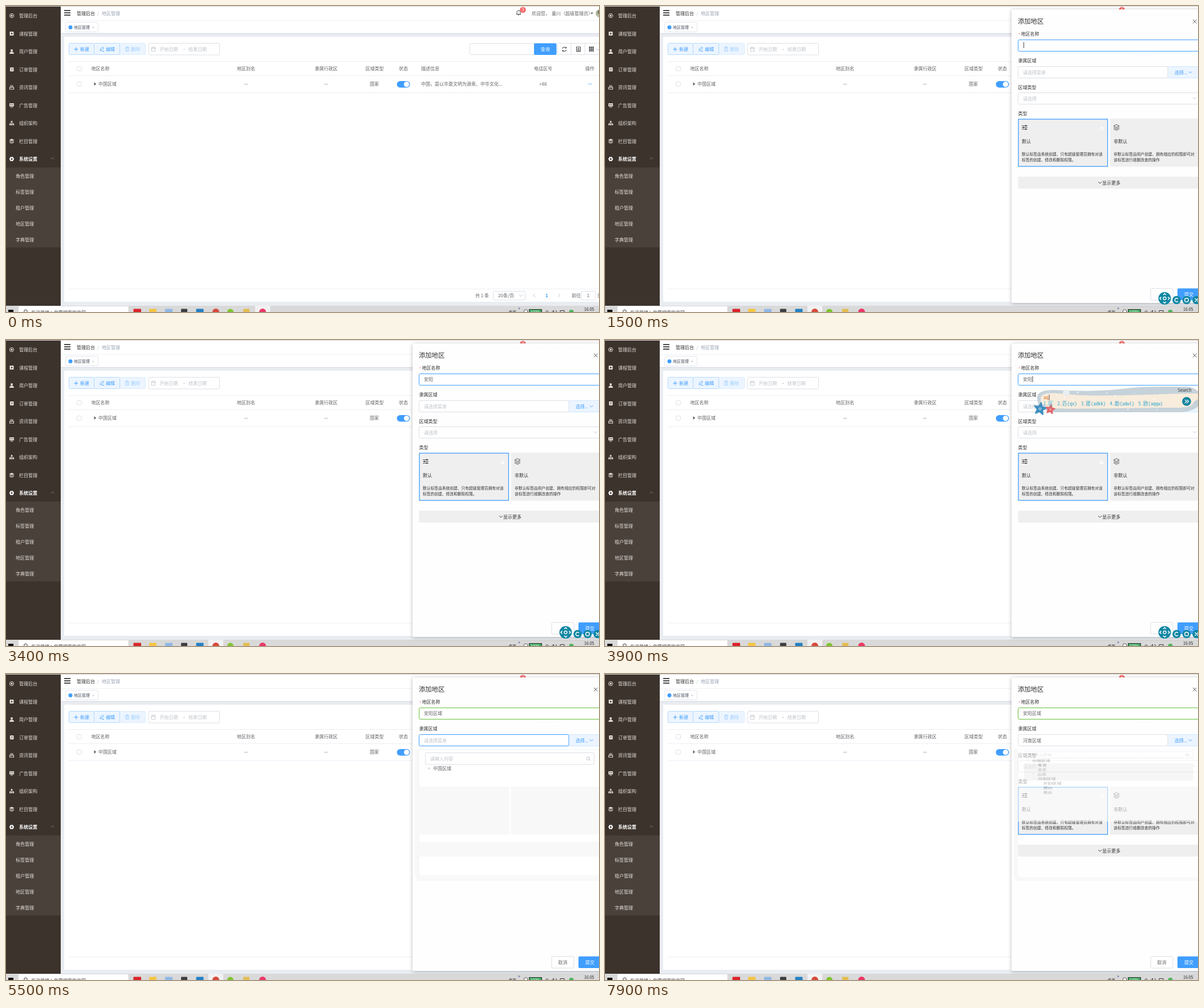
Recreate the animation shown at these times as an HTML page. Size 1040 by 538 pixels, loop 8 s.

```html
<!DOCTYPE html>
<html lang="zh-CN">
<head>
<meta charset="utf-8">
<title>地区管理</title>
<style>
html, body { margin: 0; width: 100%; height: 100%; overflow: hidden; background: #fff; }
svg { display: block; width: 1040px; height: 538px; }
text { font-family: "Noto Sans CJK SC", "Noto Sans CJK", "Noto Sans", sans-serif; white-space: pre; }
.code text { font-family: "Noto Sans Mono CJK SC", "Noto Sans CJK SC", monospace; }
.anim { animation: 8s step-end infinite; }
.name { animation-name: name; }
.parent { animation-name: parent; }
.caret { animation-name: caret; }
.pop { animation-name: pop; transform-origin: 724px 133px; }
.rows { animation-name: rows; }
.kids { animation-name: kids; }
@keyframes name {
  0% { stroke: #dcdfe6; } 17.5% { stroke: #8ec5ff; } 18.75% { stroke: #409eff; }
  65% { stroke: #67c23a; }
}
@keyframes parent {
  0% { stroke: #dcdfe6; } 63.75% { stroke: #8ec5ff; } 65% { stroke: #409eff; }
  77.5% { stroke: #8ec5ff; } 78.75% { stroke: #dcdfe6; }
}
@keyframes caret {
  0% { opacity: 0; transform: none; }
  17.5% { opacity: 1; transform: none; }
  23.75% { opacity: 0; transform: none; }
  26.25% { opacity: 1; transform: translateX(1px); }
  31.25% { opacity: 0; transform: none; }
  36.25% { opacity: 1; transform: translateX(15.5px); }
  42.5% { opacity: 0; transform: none; }
  46.25% { opacity: 1; transform: translateX(15.5px); }
  53.75% { opacity: 1; transform: translateX(31.5px); }
  60% { opacity: 0; transform: none; }
}
@keyframes pop {
  0% { opacity: 0; transform: none; }
  65% { opacity: .4; transform: scaleY(.5); }
  66.25% { opacity: .8; transform: scaleY(.85); }
  67.5% { opacity: .95; transform: scaleY(.97); }
  68.75% { opacity: 1; transform: none; }
  98.75% { opacity: .58; transform: scaleY(.57); }
}
@keyframes rows {
  0% { opacity: 0; clip-path: inset(0 0 100% 0); }
  77.5% { opacity: 1; clip-path: inset(0 0 65% 0); }
  78.75% { opacity: 1; clip-path: inset(0 0 20% 0); }
  80% { opacity: 1; clip-path: none; }
}
@keyframes kids {
  0% { opacity: 0; clip-path: inset(0 0 100% 0); }
  87.5% { opacity: 1; clip-path: inset(0 0 65% 0); }
  88.75% { opacity: 1; clip-path: inset(0 0 20% 0); }
  90% { opacity: 1; clip-path: none; }
}
</style>
</head>
<body>
<svg id="stage" viewBox="0 0 1040 538"></svg>
<script>
const INK = '#606266', DARK = '#303133', MUTE = '#bcc0c8', LINE = '#dcdfe6', BLUE = '#409eff', PALE = '#ecf5ff';
const LOOP = 8000;
let css = '';

const text = (x, y, s, fill = INK, size = 8, more = '') =>
  `<text x="${x}" y="${y + size * .38}" font-size="${size}" fill="${fill}" ${more}>${s}</text>`;
const mid = (x, y, s, fill, size) => text(x, y, s, fill, size, 'text-anchor="middle"');
const rect = (x, y, w, h, fill, more = '') =>
  `<rect x="${x}" y="${y}" width="${w}" height="${h}" fill="${fill}" ${more}/>`;
const box = (x, y, w, h, stroke = LINE, fill = '#fff', more = '') =>
  rect(x, y, w, h, fill, `stroke="${stroke}" rx="2" ${more}`);
const dot = (x, y, r, fill, more = '') => `<circle cx="${x}" cy="${y}" r="${r}" fill="${fill}" ${more}/>`;
const line = (d, stroke = INK, w = 1, more = '') =>
  `<path d="${d}" fill="none" stroke="${stroke}" stroke-width="${w}" ${more}/>`;
const shape = (d, fill, more = '') => `<path d="${d}" fill="${fill}" ${more}/>`;
const at = (x, y, s) => `<g transform="translate(${x} ${y})">${s}</g>`;
const down = (x, y, c = MUTE) => line(`M${x - 3} ${y - 1.5}l3 3 3-3`, c, .9);
const lens = (x, y, c, r = 2.8) => dot(x, y, r, 'none', `stroke="${c}"`) + line(`M${x + r * .7} ${y + r * .7}l2 2`, c);

// Shows a group from a to b milliseconds of each loop.
function during(a, b, s) {
  const p = t => t * 100 / LOOP;
  css += `@keyframes w${a}_${b}{0%{opacity:0}${p(a)}%{opacity:1}${p(b)}%{opacity:0}}`;
  return `<g class="anim" style="animation-name:w${a}_${b}">${s}</g>`;
}

function sidebar() {
  const c = '#e4dfda', hole = '#3c332d';
  const icons = [
    dot(0, 0, 3.6, 'none', `stroke="${c}"`) + dot(0, 0, 1.7, c),
    rect(-3.5, -3.5, 7, 7, c, 'rx="1"') + shape('M-1-2l3 2-3 2z', hole),
    dot(0, -2, 2, c) + shape('M-4 4c0-5 8-5 8 0z', c),
    rect(-3, -3.5, 6.5, 7, c, 'rx="1"') + line('M-1-1h3M-1 1h2', hole, .8),
    line('M-2.5-3h5M-3.5 3.3h7V0h-7z', c, 1.1) + line('M-3-1h6', c),
    rect(-4, -3.5, 8, 5.5, c, 'rx=".5"') + line('M-2 3.5h4', c) + line('M-2.5-1h2M1-1h1.5', hole, 1.4),
    line('M0-2v2M-3 2V0h6v2', c, .8) + rect(-1.3, -4, 2.6, 2.4, c) + [-4, -1.2, 1.8].map(x => rect(x, 1.2, 2.4, 2.4, c)).join(''),
    shape('M0-4l4.5 2L0 0l-4.5-2z', c) + line('M-4 0l4 2 4-2M-4 2l4 2 4-2', c),
    dot(0, 0, 2.6, 'none', 'stroke="#fff" stroke-width="2"') + line('M-4 0h1.5M4 0H2.5M-2-3.5l1 1.5M2-3.5l-1 1.5M-2 3.5l1-1.5M2 3.5l-1-1.5', '#fff', 1.6),
  ];
  const main = ['管理后台', '课程管理', '用户管理', '订单管理', '资讯管理', '广告管理', '组织架构', '栏目管理', '系统设置'];
  const sub = ['角色管理', '标签管理', '租户管理', '地区管理', '字典管理'];
  return rect(0, 1, 96, 526, '#3c332d') + rect(0, 284, 96, 140.5, '#4a413b') +
    main.map((s, i) => {
      const y = 17 + i * 31.5, last = i === 8;
      return at(10, y, icons[i]) + text(23, y, s, last ? '#fff' : c, 8, last ? 'font-weight="700"' : '');
    }).join('') +
    line('M78.5 269.5l3-3 3 3', '#8f8883', .8) +
    sub.map((s, i) => text(17, 299 + i * 28, s, c)).join('');
}

function header() {
  return rect(96, 1, 944, 47, '#fff') + line('M96 25.5H1040', '#f0f1f4') + line('M96 48.3H1040', '#d5d9e1', 1.2) +
    line('M102 8h11M102 12h11M102 16h11', '#111', 1.7) +
    text(124, 12.5, '管理后台', DARK, 8, 'font-weight="500"') + text(160, 12.5, '/', MUTE) + text(168, 12.5, '地区管理', '#97a3b4') +
    line('M895 14.5h8M896 14.5v-3c0-5 6-5 6 0v3M898 16h2', '#444') +
    dot(906.5, 6.8, 5.3, '#f56c6c') + mid(906.5, 6.8, '3', '#fff', 7) +
    text(922, 12.5, '欢迎您，') + text(957, 12.5, '童川（超级管理员）') + shape('M1025 11.5h5l-2.5 3z', INK) +
    dot(1041, 13, 7, '#b5bda3') + dot(1041, 11, 3.5, '#70795f') +
    box(104.5, 28.5, 57, 17, '#e2e6ed') + dot(113, 37.5, 3.5, BLUE) + text(119, 37.5, '地区管理', '#495060', 7) +
    line('M151.5 36.5l2.5 2.5m0-2.5l-2.5 2.5', '#aaa', .7);
}

const newButton = (bg, edge, ink) => box(110.5, 65.5, 44, 20, edge, bg) +
  line('M119.5 76h7M123 72.5v7', ink) + text(130, 76, '新建', ink, 8, 'font-weight="500"');

function toolbar() {
  const ink = '#444';
  return box(199.5, 65.5, 45, 20, '#d9ecff', PALE) + box(154.5, 65.5, 45, 20, '#b3d8ff', PALE) +
    newButton(PALE, '#b3d8ff', BLUE) +
    during(400, 1400, newButton(BLUE, BLUE, '#fff')) + 
    line('M165 78.5l.5-2.5 4-4 2 2-4 4zM168 79.5h4', BLUE, .9) + text(175, 76, '编辑', BLUE, 8, 'font-weight="500"') +
    line('M209 73.5h7M211 73v-1.2h3V73M210 74v5.5h5V74M212.5 75v3', '#9fcfff', .9) + text(219, 76, '删除', '#9fcfff', 8, 'font-weight="500"') +
    box(250, 65.5, 124.5, 20.5) + line('M255 73h7v6.5h-7zM255 75h7M257 71.5v2M260 71.5v2', MUTE, .8) +
    text(269.5, 76, '开始日期', MUTE) + text(311, 76, '-', INK) + text(320, 76, '结束日期', MUTE) +
    box(813.5, 66, 114, 19.5) + rect(926, 65.5, 39.5, 20.5, BLUE, 'rx="2"') + mid(945.7, 76, '查询', '#fff') +
    box(967.5, 65.5, 80, 20) + line('M991 65.5v20M1015.5 65.5v20', LINE) +
    line('M976 75a3.4 3.4 0 0 1 6-1.5M982.5 77a3.4 3.4 0 0 1-6 1.5', ink, 1.1) + shape('M983 71.5v3h-3zM975.500 80.500v-3h3z', ink) +
    line('M1000.500 72h7v8h-7zM1002 74.500h4M1002 76.500h4M1002 78.500h4', ink) +
    [0, 1, 2, 3, 4, 5, 6, 7, 8].map(i => rect(1022.5 + i % 3 * 3, 71.5 + (i / 3 | 0) * 3, 2.4, 2.4, ink)).join('') +
    down(1038, 76.5);
}

function table() {
  const cols = [[149.5, '地区名称'], [405, '地区别名'], [541.5, '隶属行政区'], [630.5, '区域类型'], [689, '状态'], [728, '描述信息'], [926, '电话区号'], [1016, '操作']];
  return line('M110 97.5H1040M110 122.5H1040M110 152.500H1040M110 497.500H1040', '#ebeef5') +
    cols.map(([x, s]) => text(x, 110, s)).join('') +
    box(124.5, 106.5, 8, 7.500) + box(124.5, 133.5, 8, 7.500) +
    shape('M154.500 134l3.800 3-3.800 3z', INK) + text(162, 137, '中国区域') +
    mid(421, 137, '—') + mid(561, 137, '—') + text(638, 137, '国家') +
    rect(685.5, 132, 23, 11.5, BLUE, 'rx="5.7"') + dot(702.5, 137.7, 4.7, '#fff') +
    text(728, 137, '中国，是以华夏文明为源泉、中华文化...') + mid(942, 137, '+86') +
    [1021.5, 1024, 1026.5].map(x => dot(x, 137, .8, BLUE)).join('') +
    text(823, 509, '共 1 条') + box(854.5, 501.5, 56, 15.5) + text(863, 509, '20条/页') + down(903, 509) +
    line('M928 506l-3 3 3 3M968.500 506l3 3-3 3', MUTE, .9) +
    text(946, 509, '1', BLUE, 8, 'font-weight="700"') + text(992, 509, '前往') +
    box(1008.5, 501.5, 25.5, 15.5) + mid(1021, 509, '1') + text(1037, 509, '页');
}

function taskbar() {
  const tile = (x, w, c) => rect(x, 532.5, w, 10, c, 'rx="1"');
  return rect(0, 527, 1040, 11, '#d9d9d9') + rect(22, 528, 192.5, 10, '#fff') + rect(4, 534, 9, 9, '#111') +
    lens(34.5, 537, '#333') + text(44, 538.5, '在这里输入你要搜索的内容', '#444') +
    during(0, 700, rect(437, 527, 26.5, 11, '#f1f1f1')) + during(700, LOOP, rect(355, 527, 26, 11, '#f1f1f1')) +
    tile(223.5, 13.5, '#d9242a') + tile(251, 13, '#f5c545') + tile(279, 13, '#8fb7e6') + tile(307, 11, '#3b3f42') + tile(333.5, 13, '#2380c4') +
    dot(368, 538, 6, '#d84a3c') + dot(393.5, 538, 5.5, '#7fc52c') + tile(416, 11, '#e3bd52') + dot(450, 538, 6, '#ea3866') +
    text(881, 538.500, '桌面', '#222', 7) + text(898, 530.5, '»', '#2b3a8c', 8) +
    rect(908.500, 534, 6, 6, '#fff', 'stroke="#555" rx="2"') + rect(917.5, 533.5, 22, 8, '#36a559', 'stroke="#333"') + mid(928.500, 538, '100%', '#fff', 7) +
    line('M946 538.500l3-3 3 3M957.500 538l3-3v4M964 535l2 3M972 535.500h7v4M972 535.500v3', '#333') + dot(991.500, 538, 4, '#4bb35c') +
    text(1014, 533, '16:05', '#222', 7);
}

function drawer() {
  const card = (x, y, title, a, b) => text(x, y, title, DARK) +
    text(x, y + 22.5, a, DARK, 6.75) + text(x, y + 32.5, b, DARK, 6.75);
  return rect(713, 6, 340, 516, '#fff', 'fill-opacity=".975" filter="url(#soft)"') +
    text(724, 26.5, '添加地区', DARK, 11.3) + line('M1031 24l6.500 6.500m0-6.500l-6.500 6.500', '#555') +
    text(725, 50, '*', '#f56c6c', 7) + text(729.5, 49, '地区名称', DARK) +
    box(724.5, 59.5, 330, 20, LINE, '#fff', 'class="anim name"') +
    text(724.5, 96, '隶属区域', DARK) +
    box(986.5, 106.5, 70, 20, '#cfe6ff', PALE) + text(999, 116.5, '选择...', BLUE) + down(1026.5, 116.5, BLUE) +
    box(724.5, 106.5, 262.5, 20, LINE, '#fff', 'class="anim parent"') +
    during(0, 7000, text(733, 116.5, '请选择菜单', MUTE)) + during(7000, LOOP, text(733, 116.5, '河南区域')) +
    text(724.5, 143, '区域类型', DARK) + box(724.5, 152.5, 330, 20) + text(733, 162.5, '请选择', MUTE) + down(1034, 162) +
    text(724.5, 189, '类型', DARK) +
    rect(725, 199, 156.500, 83, '#efefef', `stroke="${BLUE}" stroke-width="1.3"`) + rect(885.5, 198, 160, 84.5, '#efefef') +
    line('M731 210.500h10M731 213.500h10M731 216.500h10', '#444', .9) + line('M738 209v3M734 212v3M738 215v3', '#444', 1.4) +
    dot(871, 215.500, 3, '#fff') + dot(871, 215.500, .8, '#9cf') +
    line('M897 208.500l5 2.500-5 2.500-5-2.500zM892 213.500l5 2.500 5-2.500M892 216l5 2.500 5-2.500', '#444', .9) +
    card(731, 238, '默认', '默认标签由系统创建、只有超级管理员拥有对该', '标签的创建、修改和删除权限。') +
    card(892, 238, '非默认', '非默认标签由用户创建、拥有相应的权限即可对', '该标签进行增删改查的操作') +
    rect(724.5, 300, 320, 21, '#efefef') + down(868, 310.5, DARK) + text(872, 310.5, '显示更多', DARK) +
    box(957, 496.5, 39, 20.5) + mid(976.5, 506.7, '取消') +
    rect(1004, 496.5, 40, 20.5, BLUE, 'rx="2"') + text(1016, 506.7, '提交', '#fff') +
    during(2900, 4300, text(733, 69, '安阳')) + during(4300, LOOP, text(733, 69, '安阳区域')) +
    during(2100, 2900, line('M733 74h2.500', INK)) +
    rect(734, 63.5, .9, 10.5, '#333', 'class="anim caret"');
}

function picker() {
  const row = (x, i, s, arrow) => text(x, 166 + i * 14, s) + (arrow ? shape(arrow === 'v'
    ? `M${x - 9} ${165 + i * 14}h4l-2 2.500z` : `M${x - 8} ${164 + i * 14}l2.500 2-2.500 2z`, MUTE) : '');
  const ghost = '#f8f8f8';
  return during(5400, LOOP, line('M720.500 133V352q0 8.500 8 8.500H1040', ghost, 7)) +
    '<g class="anim pop">' + rect(724, 133, 330, 222, '#fff', 'stroke="#f0f1f4"') +
    during(5100, 7900, rect(724.5, 198, 158, 84, ghost) + rect(885.5, 198, 160, 84, ghost) + rect(724.5, 295, 320, 26, ghost)) +
    during(7900, LOOP, rect(735, 175, 296.500, 53, '#efefef')) +
    box(735.5, 138.5, 296, 20.5) + text(744, 149, '请输入内容', MUTE) + lens(1021, 148.500, MUTE) +
    during(5100, 6200, row(749, 0, '中国区域', '>')) + during(6200, LOOP, row(749, 0, '中国区域', 'v')) +
    '<g class="anim rows">' + row(758.5, 1, '香港') + row(758.5, 2, '北京') + row(758.5, 3, '山东', '>') +
    during(6200, 7000, row(758.5, 4, '河南区域', '>')) + during(7000, LOOP, row(758.5, 4, '河南区域', 'v')) + '</g>' +
    '<g class="anim kids">' + row(768.5, 5, '开封区域') + row(768.5, 6, '郑州') + row(768.5, 7, '商丘') + '</g></g>';
}

function star(cx, cy, r, fill) {
  const pts = Array.from({ length: 10 }, (_, i) => {
    const a = i * Math.PI / 5 - 1.4, k = i % 2 ? r * .45 : r;
    return `${(cx + k * Math.cos(a)).toFixed(1)},${(cy + k * Math.sin(a)).toFixed(1)}`;
  });
  return `<polygon points="${pts.join(' ')}" fill="${fill}" stroke="${fill}" stroke-width="2" stroke-linejoin="round"/>` + dot(cx, cy, r * .25, '#fff', 'opacity=".35"');
}

// Input method window; r is its right edge before the shift dx.
function candidates(dx, r, code, list) {
  let x = 753, words = '';
  list.split(' ').forEach((s, i) => {
    const word = `${i + 1}.${s}`;
    words += text(x, 112, word, '#2fa5d0', 8.6);
    x += [...word].reduce((w, c) => w + (c > '~' ? 8.6 : 4.3), 7.2);
  });
  let specks = '';
  for (let i = 0; i < 26; i++) specks += dot(762 + i * 37 % (r - 785), 91 + i * 29 % 33, .7 + i % 3 * .3, '#fff', 'opacity=".8"');
  return at(dx, 0,
    shape(`M742 104C740 92 752 87 775 88S840 91 880 87 S920 81.500 ${r - 28} 82C${r - 6} 83 ${r + 1} 96 ${r - 1} 108C${r - 5} 123 ${r - 25} 128 ${r - 50} 127H775C752 127 743 116 742 104Z`, '#c6d2d9') +
    shape(`M748 105C747 93 762 92 790 95S850 99 ${r - 60} 95 S${r - 10} 100 ${r - 14} 110S${r - 35} 119 ${r - 60} 119 S780 122 770 120 S749 116 748 105Z`, '#f8ecdc') +
    specks + dot(793, 93, 6, '#e9eef0') +
    star(747, 121, 11, '#3f8fc0') + star(765, 122, 8, '#e0676c') +
    text(r - 41.5, 88.5, 'Search', DARK, 7.5) + dot(r - 26, 108, 7.8, '#12839f') +
    line(`M${r - 29} 105l3 3-3 3m3.500-6l3 3-3 3`, '#fff', 1.2) +
    `<g class="code">${text(753, 101, code, '#e8701a', 9)}${words}</g>` +
    rect(753.5 + code.length * 4.6, 96, .8, 10, '#333'));
}

function inputMethod() {
  const teal = '#0f87a3';
  return during(1500, 5100,
    rect(968, 500, 26, 16, '#fff') + dot(981.5, 514, 11, teal) + dot(981.5, 514, 2.5, 'none', 'stroke="#fff" stroke-width="1.3"') +
    line('M979 508l2.500-2.500 2.500 2.500M979 520l2.500 2.500 2.500-2.500M975.500 511.500L973 514l2.500 2.500M987.500 511.500l2.500 2.500-2.500 2.500', '#fff', 1.5) +
    [1002.5, 1020, 1037.5].map(x => dot(x, 517, 7.3, teal)).join('') +
    line('M1005 515a3.200 3.200 0 1 0 0 4M1034.500 514l6 6m0-6l-6 6', '#fff', 1.4) + dot(1020, 517, 3.3, 'none', 'stroke="#fff" stroke-width="1.4"')) +
    during(2100, 2200, candidates(0, 977, 'p', '这 之 怕(nrg) 跑(khqn) 拍(rrg)')) +
    during(2200, 2800, candidates(0, 964, 'pv', '安 案(s) 宴(jv) 寇(fqc) 按(rpv)')) +
    during(2800, 2900, candidates(0, 964, 'pvb', '字 安阳(j) 安防(y) 安陆(f)')) +
    during(3700, 3900, candidates(16, 1030, 'a', '工 戈 或(kgd) 其(adw) 东(aii) 區(kkk)')) +
    during(3900, 4000, candidates(16, 1030, 'aq', '区 匹(qv) 匿(adkk) 勘(adwl) 欧(aqqw)')) +
    during(4000, 4200, candidates(16, 1030, 'aqf', '区域(a) 芜(qb) 区块(fn) 苑(qbb) 区志(fn)')) +
    during(4200, 4300, candidates(16, 1030, 'aqfa', '区域 区域性(ntg) 区域化(wxn) 区域网(mqq)'));
}

const stage = document.getElementById('stage');
const picture = '<defs><filter id="soft" x="-10%" y="-10%" width="120%" height="120%"><feDropShadow dx="0" dy="1" stdDeviation="3" flood-opacity=".28"/></filter></defs>' +
  rect(0, 0, 1040, 538, '#e9ecf1') + rect(0, 0, 1040, 1, '#d4d4d4') +
  rect(102, 54, 938, 466, '#fff') + sidebar() + header() + toolbar() + table() + taskbar() +
  during(700, LOOP, drawer() + picker()) + inputMethod();
document.head.appendChild(document.createElement('style')).textContent = css;
stage.innerHTML = picture;
</script>
</body>
</html>
```
